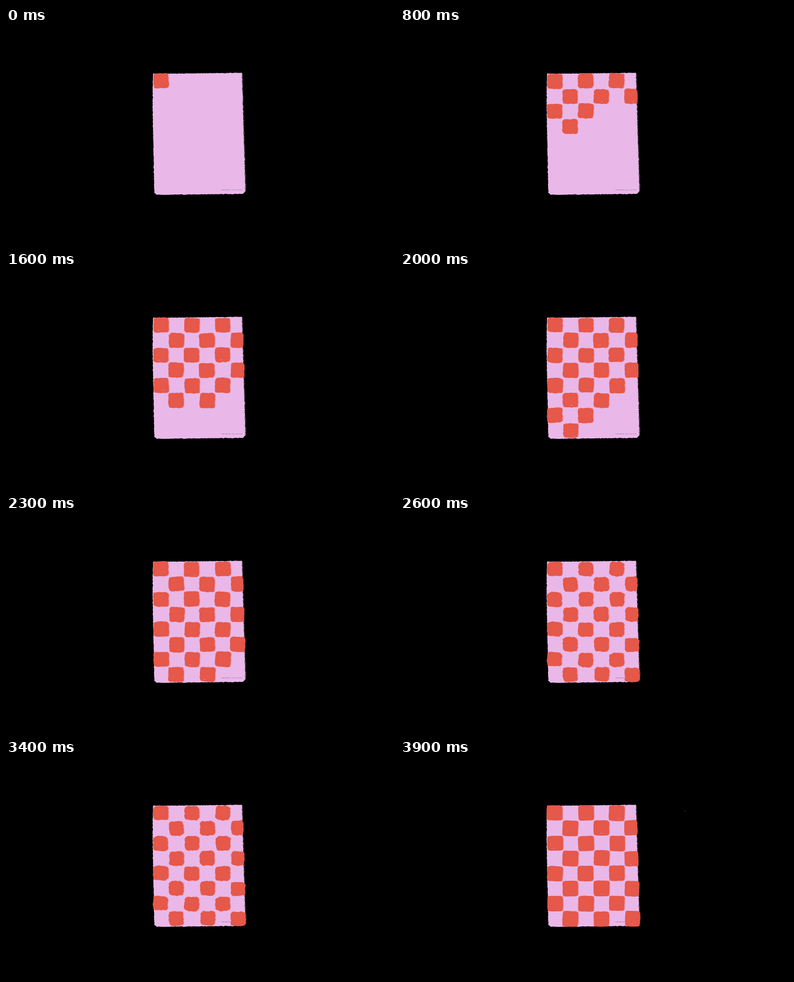
Recreate the animation shown at these times as an HTML page with a canvas. Size 692 px wide and 388 px high, loop 4 s.

```html
<!DOCTYPE html>
<html lang="en">
<head>
<meta charset="utf-8">
<title>Painted checkerboard</title>
<style>
  html, body { margin: 0; width: 100%; height: 100%; overflow: hidden; background: #000; }
  canvas { display: block; width: 692px; height: 388px; }
</style>
</head>
<body>
<canvas id="stage" width="692" height="388"></canvas>
<script>
const ctx = document.getElementById('stage').getContext('2d');
const STEP = 100, STEPS = 40;
const COLS = 6, ROWS = 8;
const RED = '#e5584a', PINK = '#e9b8e8';

function seeded(seed) {
  let s = (seed * 2654435761 + 97) >>> 0;
  return () => {
    s = (s + 0x6d2b79f5) >>> 0;
    let t = Math.imul(s ^ (s >>> 15), s | 1);
    t ^= t + Math.imul(t ^ (t >>> 7), t | 61);
    return ((t ^ (t >>> 14)) >>> 0) / 4294967296;
  };
}

// Random offset in the range -amount to amount.
const spread = (random, amount) => (random() * 2 - 1) * amount;

const cardRight = y => 421 + (y - 81) * 0.029;

// Painted diagonal by diagonal, with the left column lagging behind.
function paintingOrder() {
  const cells = [];
  for (let row = 0; row < ROWS; row++) {
    for (let col = row % 2; col < COLS; col += 2) {
      cells.push({ row, col, turn: col + row + (col ? 0 : row / 2) });
    }
  }
  return cells.sort((a, b) => a.turn - b.turn);
}
const CELLS = paintingOrder();

// Closed outline through the corners, roughened between them.
function roughPath(corners, spacing, amount, random) {
  const path = new Path2D();
  corners.forEach(([x, y], i) => {
    const [nx, ny] = corners[(i + 1) % corners.length];
    const n = Math.max(1, Math.round(Math.hypot(nx - x, ny - y) / spacing));
    for (let k = 0; k < n; k++) {
      path.lineTo(x + (nx - x) * k / n + spread(random, amount),
                  y + (ny - y) * k / n + spread(random, amount));
    }
  });
  path.closePath();
  return path;
}

const CARD = roughPath([
  [262, 82], [340, 81.5], [421, 80.5], [427.3, 293],
  [422, 298], [340, 299], [269, 299.5], [264.5, 296], [261.5, 150]
], 2, 0.5, seeded(5));

function drawCard() {
  ctx.fillStyle = PINK;
  ctx.fill(CARD);

  // Dry-brush grain down the right edge
  const random = seeded(11);
  for (let i = 0; i < 260; i++) {
    const y = 84 + random() * 208;
    ctx.fillStyle = random() < 0.5 ? '#6b5870' : '#2a222c';
    ctx.fillRect(cardRight(y) + spread(random, 1.2), y, 0.9, 0.9);
  }

  // Scratch near the bottom corner
  ctx.fillStyle = '#8d7490';
  for (let x = 384; x < 421; x++) {
    if (random() < 0.8) ctx.fillRect(x, 290 + random(), 1.2, 0.7);
  }
}

// A square brush blob; neat runs from 0 (ragged, round) to 1 (crisp, square).
function blobPath(cx, cy, w, h, neat, random) {
  const path = new Path2D();
  const points = 28, power = 5 + 5 * neat, ragged = 0.065 - 0.045 * neat;
  const tilt = spread(random, 0.05);
  for (let i = 0; i < points; i++) {
    const a = i / points * Math.PI * 2 + Math.PI / 4;
    const c = Math.cos(a), s = Math.sin(a);
    const r = (Math.abs(c) ** power + Math.abs(s) ** power) ** (-1 / power)
      * (1 + spread(random, ragged)) / 2;
    path.lineTo(cx + w * r * (c - s * tilt), cy + h * r * (s + c * tilt));
  }
  path.closePath();
  return path;
}

function drawCell({ row, col }, neat, random) {
  const size = 26.4 + 1.6 * neat;
  const cx = 276.3 + col * 27.6 + spread(random, 0.8);
  const cy = 95.3 + row * 27.1 + spread(random, 0.8);
  const left = cx - size / 2 + spread(random, 0.5);
  const right = Math.min(cx + size / 2, cardRight(cy) + 1);
  const height = size - 0.6 + spread(random, 0.8);
  const path = blobPath((left + right) / 2, cy, right - left, height, neat, random);

  ctx.fillStyle = RED;
  ctx.save();
  ctx.globalAlpha = 0.3;
  ctx.translate(1.2, 0);
  ctx.fill(path);
  ctx.restore();
  ctx.fill(path);

  if (random() < 0.4 * neat) {
    ctx.fillStyle = '#efa9b5';
    ctx.fillRect(cx + spread(random, 8), cy + 8 + random() * 2, 2.5, 0.7);
  }
}

function draw(step) {
  ctx.fillStyle = '#000';
  ctx.fillRect(0, 0, 692, 388);
  drawCard();

  // One new cell per step with a short hold, then two poses alternate.
  const count = Math.min(CELLS.length, step < 18 ? step + 1 : step);
  const done = count === CELLS.length;
  const neat = done ? step % 2 : 0.5;
  const pose = done ? STEPS + step % 2 : step;
  CELLS.slice(0, count).forEach((cell, i) => drawCell(cell, neat, seeded(i * 50 + pose)));

  if (done && neat) {
    ctx.fillStyle = '#4a3b4b';
    ctx.fillRect(507, 91, 1.5, 1.5);
  }
}

const start = performance.now();
let shown = -1;
function tick() {
  const step = Math.floor((performance.now() - start) / STEP) % STEPS;
  if (step !== shown) draw(shown = step);
  requestAnimationFrame(tick);
}
tick();
</script>
</body>
</html>
```
